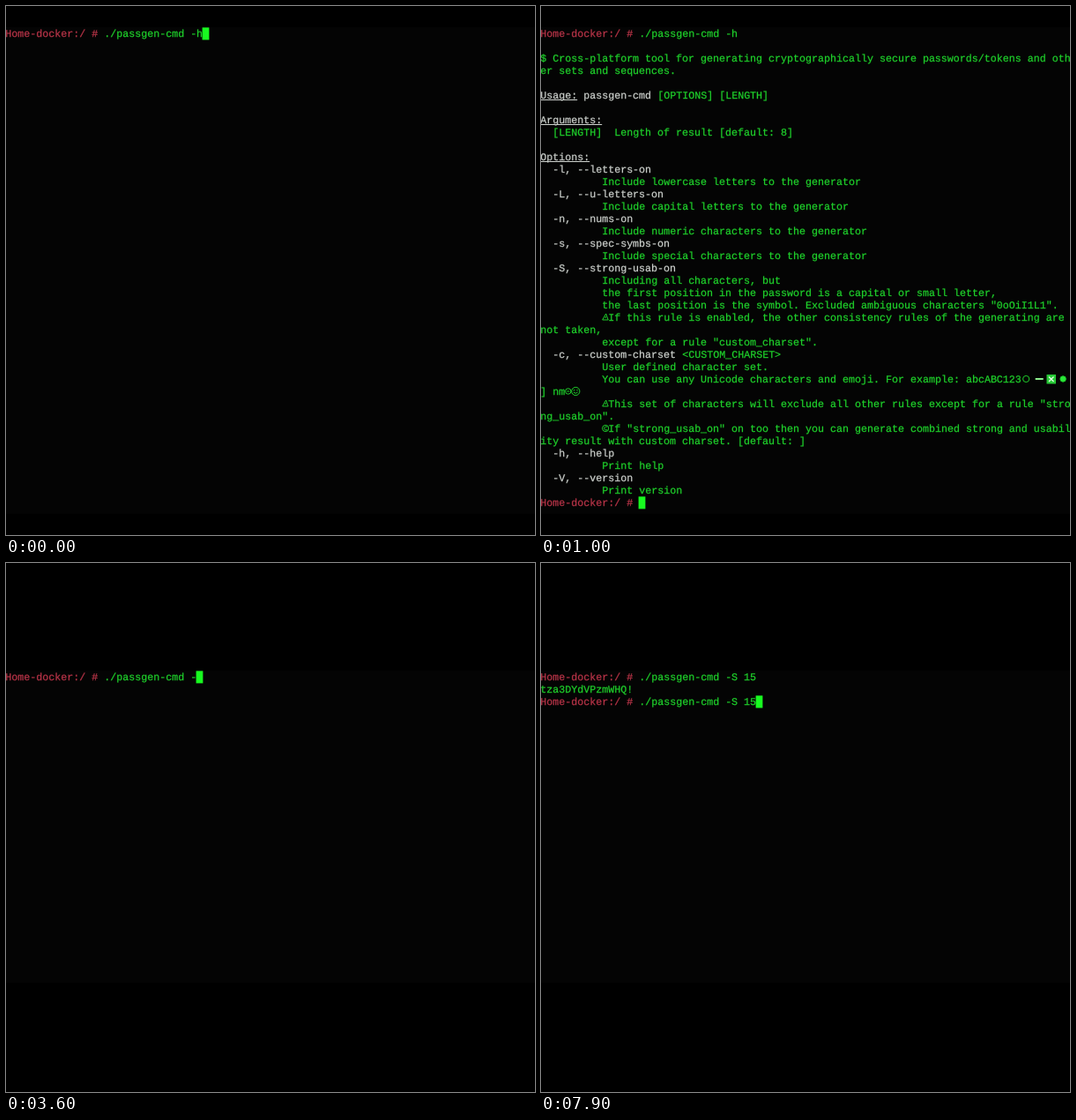
An HTML page for the animation above (8000 ms loop, 600 by 600 pixels).

```html
<!DOCTYPE html>
<html lang="en">
<head>
<meta charset="utf-8">
<title>Password generator terminal</title>
<style>
  html, body { margin: 0; width: 100%; height: 100%; overflow: hidden; background: #000; }
  svg { display: block; width: 100vw; height: 100vh; }
  text {
    font: 11.667px "Liberation Mono", "Courier New", monospace;
    white-space: pre;
    stroke-width: 0.25px;
    text-rendering: geometricPrecision;
  }
</style>
</head>
<body>
<svg id="stage" viewBox="0 0 600 600"></svg>
<script>
const LOOP = 8000, CELL = 7, ROW = 14, LEFT = -0.8;
const GREEN = '#1fd02b', RED = '#b83448', WHITE = '#ccd0cc', CURSOR = '#18fa20';
const PROMPT = 'Home-docker:/ # ';
const COMMAND = './passgen-cmd ';
const START = PROMPT.length;

const HELP = `

$ Cross-platform tool for generating cryptographically secure passwords/tokens and oth
er sets and sequences.

Usage: passgen-cmd [OPTIONS] [LENGTH]

Arguments:
  [LENGTH]  Length of result [default: 8]

Options:
  -l, --letters-on
          Include lowercase letters to the generator
  -L, --u-letters-on
          Include capital letters to the generator
  -n, --nums-on
          Include numeric characters to the generator
  -s, --spec-symbs-on
          Include special characters to the generator
  -S, --strong-usab-on
          Including all characters, but
          the first position in the password is a capital or small letter,
          the last position is the symbol. Excluded ambiguous characters "0oOiI1L1".
           If this rule is enabled, the other consistency rules of the generating are
not taken,
          except for a rule "custom_charset".
  -c, --custom-charset <CUSTOM_CHARSET>
          User defined character set.
          You can use any Unicode characters and emoji. For example: abcABC123
] nm
           This set of characters will exclude all other rules except for a rule "stro
ng_usab_on".
           If "strong_usab_on" on too then you can generate combined strong and usabil
ity result with custom charset. [default: ]
  -h, --help
          Print help
  -V, --version
          Print version`.split('\n');

const stage = document.getElementById('stage');

function add(parent, tag, attrs, content) {
  const el = document.createElementNS('http://www.w3.org/2000/svg', tag);
  for (const key in attrs) el.setAttribute(key, attrs[key]);
  if (content) el.textContent = content;
  return parent.appendChild(el);
}

function screen(top, height) {
  const g = add(stage, 'g', {});
  add(g, 'rect', { y: top, width: 600, height, fill: '#040404' });
  const body = add(g, 'g', { transform: `translate(${LEFT} ${top})` });
  return { g, body };
}

const write = (body, row, col, text, fill) =>
  add(body, 'text', { x: col * CELL, y: row * ROW + 10.6, fill, stroke: fill }, text);

const addCursor = body =>
  add(body, 'rect', { width: 7.8, height: 14, fill: CURSOR });

function moveCursor(cursor, row, col) {
  cursor.setAttribute('x', col * CELL - 0.6);
  cursor.setAttribute('y', row * ROW + 0.4);
}

const show = (el, on) => el.setAttribute('display', on ? 'inline' : 'none');

// Help screen
const help = screen(24, 552);
write(help.body, 0, 0, PROMPT, RED);
write(help.body, 0, START, COMMAND + '-h', GREEN);
const output = add(help.body, 'g', {});

HELP.forEach((line, row) => {
  if (!line) return;
  const white = line.match(/^(Usage: passgen-cmd |Arguments:|Options:|  -[^<]*)/);
  const split = white ? white[0].length : 0;
  if (split) write(output, row, 0, line.slice(0, split), WHITE);
  const rest = line.slice(split);
  const indent = rest.search(/\S/);
  if (indent >= 0) write(output, row, split + indent, rest.slice(indent), GREEN);
  const title = line.match(/^[A-Z]\w+:/);
  if (title) {
    add(output, 'rect', {
      y: row * ROW + 12, width: title[0].length * CELL, height: 1, fill: WHITE
    });
  }
});
write(output, 38, 0, PROMPT, RED);

// Symbols that stand between the letters
const line = (d, extra) =>
  add(output, 'path', { d, fill: 'none', stroke: GREEN, 'stroke-width': 1, ...extra });
const ring = (cx, cy, r, fill = 'none') =>
  add(output, 'circle', { cx, cy, r, fill, stroke: GREEN, 'stroke-width': 1 });

for (const row of [23, 30]) {
  const y = row * ROW + 10;
  line(`M70.5 ${y}L74.5 ${y - 7}L77 ${y}ZM74 ${y - 4}v2`);
}
ring(74, 32 * ROW + 7, 3.6);
line(`M76 ${32 * ROW + 5.5}a2 2 0 1 0 0 3`);

const symbols = 28 * ROW + 7;
ring(551, symbols, 3.6);
line(`M561.5 ${symbols}h9`, { stroke: '#8df08d', 'stroke-width': 2 });
add(output, 'rect', { x: 574.3, y: symbols - 5, width: 10.5, height: 10.5, fill: '#27c936' });
line(`M576.8 ${symbols - 2.5}l5.5 5.5m0 -5.5l-5.5 5.5`, { stroke: '#e4ffe4', 'stroke-width': 1.4 });
ring(592.9, symbols, 3.2, '#2be83a');

const faces = 29 * ROW + 7;
ring(31.6, faces, 3.2);
line(`M30.1 ${faces}h3`);
ring(40.1, faces, 4.6);
line(`M37.8 ${faces + 1}q2.3 2.6 4.6 0M38.3 ${faces - 2}v1.4M41.9 ${faces - 2}v1.4`);

const helpCursor = addCursor(help.body);

// Password screen
const session = screen(122, 354);
write(session.body, 0, 0, PROMPT, RED);
const typed = write(session.body, 0, START, '', GREEN);
const result = add(session.body, 'g', {});
write(result, 1, 0, 'tza3DYdVPzmWHQ!', GREEN);
write(result, 2, 0, PROMPT, RED);
const recalled = write(result, 2, START, COMMAND + '-S 15', GREEN);
const sessionCursor = addCursor(session.body);

const ARGS = '-S 15';
const KEYS = [3300, 3700, 4400, 5400, 5600];
const CUT = 2700, RUN_HELP = 300, RUN_GEN = 6300, RECALL = 7900;

function draw(t) {
  show(help.g, t < CUT);
  show(session.g, t >= CUT);

  const listed = t >= RUN_HELP;
  show(output, listed);
  moveCursor(helpCursor, listed ? 38 : 0, START + (listed ? 0 : COMMAND.length + 2));

  const entry = COMMAND + ARGS.slice(0, KEYS.filter(k => t >= k).length);
  if (typed.textContent !== entry) typed.textContent = entry;
  const done = t >= RUN_GEN, again = t >= RECALL;
  show(result, done);
  show(recalled, again);
  moveCursor(sessionCursor, done ? 2 : 0, START + (done && !again ? 0 : entry.length));
}

const begin = performance.now();
function tick() {
  draw((performance.now() - begin) % LOOP);
  requestAnimationFrame(tick);
}
tick();
</script>
</body>
</html>
```
